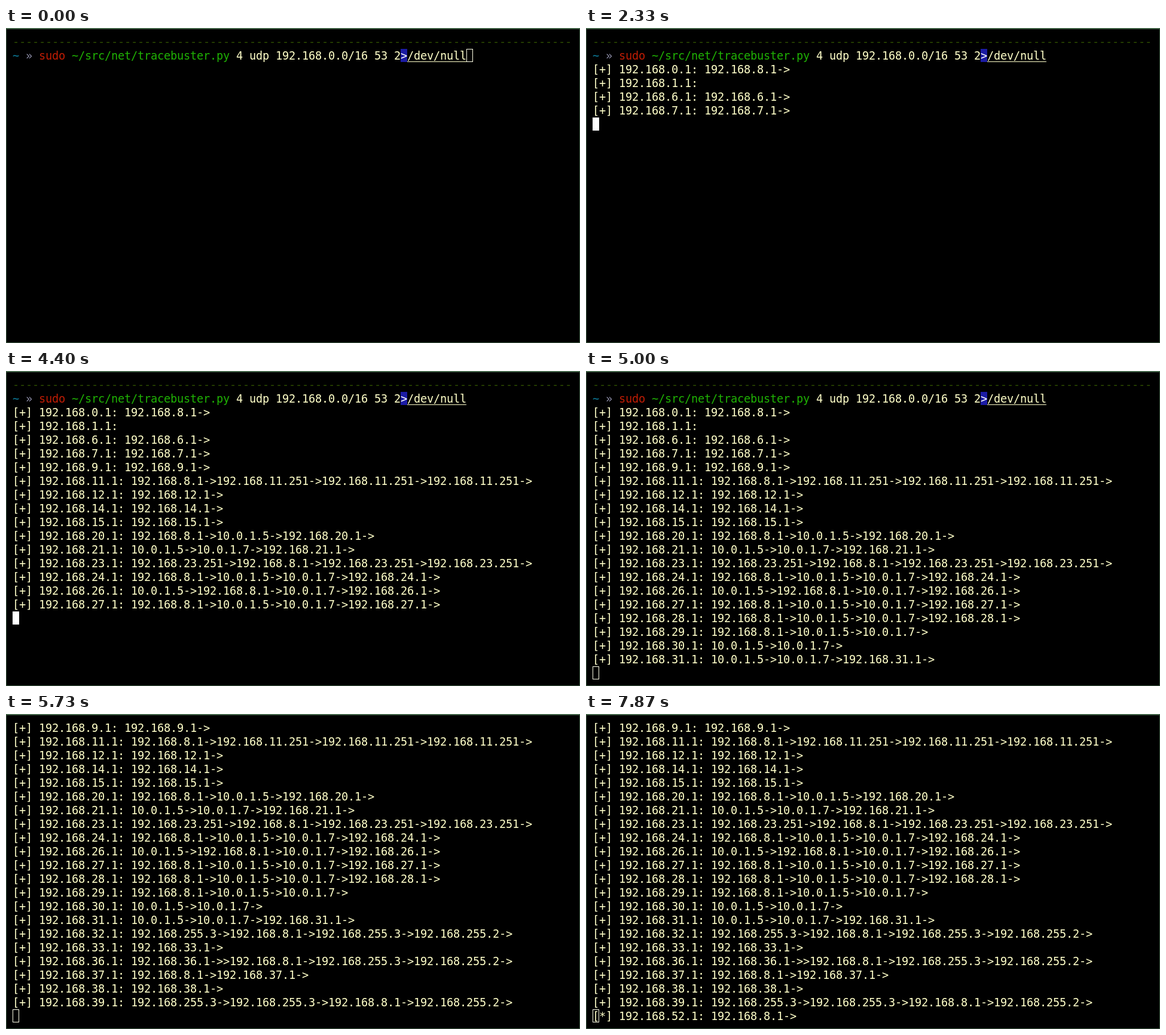
Animation of 960x528 px, one loop 8000 ms. Source, as an HTML page:

```html
<!DOCTYPE html>
<html lang="en">
<head>
<meta charset="utf-8">
<title>Terminal trace</title>
<style>
  html, body { margin: 0; width: 100%; height: 100%; overflow: hidden; background: #000; }
  #stage {
    position: relative; width: 960px; height: 528px; box-sizing: border-box; overflow: hidden;
    background: #000; border: 1px solid #38543d; border-top: 2px solid #46664b;
  }
  #view { position: absolute; left: 10px; top: 10px; width: 940px; height: 508px; overflow: hidden; }
  #page { position: absolute; left: 0; top: 0; }
  #page, #cursor {
    font: 18.67px/23px "DejaVu Sans Mono", monospace;
    letter-spacing: calc(11px - 1ch); white-space: pre; color: #ffffc8;
  }
  .row { height: 23px; position: relative; }
  .rule { color: #2c4a00; }
  .home { color: #0d7d9c; }
  .mark { color: #8c8ca6; }
  .sudo { color: #c01c04; }
  .path { color: #1fb204; }
  .pipe { position: absolute; left: 649px; top: 0; width: 11px; height: 22px; background: #1c1ca4; color: #fff; }
  .line { position: absolute; left: 660px; top: 21px; width: 99px; height: 1px; background: #ffffc8; }
  #cursor {
    position: absolute; width: 11px; height: 22px; box-sizing: border-box; overflow: hidden;
    background: #fff; color: #000;
  }
  #cursor.hollow { background: none; color: transparent; border: 1px solid #ffffe6; }
</style>
</head>
<body>
<div id="stage">
  <div id="view">
    <div id="page"><div class="row rule" id="rule"></div><div class="row"><span class="home">~</span> <span class="mark">»</span> <span class="sudo">sudo</span> <span class="path">~/src/net/tracebuster.py</span> 4 udp 192.168.0.0/16 53 2<span class="pipe">&gt;</span> /dev/null<i class="line"></i></div><div id="out"></div><div id="cursor"></div></div>
  </div>
</div>
<script>
const LOOP = 8000, ROWS = 22, ROW_H = 23, CELL = 11, PROMPT_END = 69;
const ENTER = 530, FOCUS = 330, BLUR = 5000;
const el = id => document.getElementById(id);
const page = el('page'), out = el('out'), cursor = el('cursor');
el('rule').textContent = '-'.repeat(85);

const events = [];
const address = hop => hop.split('.').length > 2 ? hop : '192.168.' + hop;
const trace = (host, hops) => `192.168.${host}.1: ` +
  hops.split(' ').filter(Boolean).map(h => address(h) + '->').join('');

// A finished line stays; a probe is overwritten by whatever comes next.
const done = (at, host, hops) => events.push({ at, keep: true, text: '[+] ' + trace(host, hops) });
const probe = (at, host, hops = '8.1') => events.push({ at, text: '[*] ' + trace(host, hops) });
const count = (at, step, from, to) => {
  for (let host = from; host <= to; host++) probe(at + step * (host - from), host);
};

const A = '10.0.1.5', B = '10.0.1.7', far = '255.3 8.1 255.3 255.2';

done(1330, 0, '8.1');
probe(1400, 1, '');
done(1530, 1, '');
count(1600, 133, 2, 5);
done(2200, 6, '6.1');
done(2330, 7, '7.1');
probe(2400, 8);
done(2530, 9, '9.1');
probe(2600, 10);
probe(2670, 11, '8.1 11.251');
done(2730, 11, '8.1 11.251 11.251 11.251');
done(2800, 12, '12.1');
probe(2870, 13);
done(2930, 14, '14.1');
done(3000, 15, '15.1');
probe(3070, 16, '');
probe(3130, 16);
probe(3330, 17);
probe(3470, 18);
probe(3530, 19);
probe(3670, 20, '8.1 ' + A);
done(3730, 20, `8.1 ${A} 20.1`);
done(3800, 21, `${A} ${B} 21.1`);
probe(3870, 22);
probe(3930, 23, '23.251 8.1');
done(4000, 23, '23.251 8.1 23.251 23.251');
done(4130, 24, `8.1 ${A} ${B} 24.1`);
probe(4200, 25);
done(4270, 26, `${A} 8.1 ${B} 26.1`);
probe(4330, 27, `8.1 ${A}`);
done(4400, 27, `8.1 ${A} ${B} 27.1`);
done(4470, 28, `8.1 ${A} ${B} 28.1`);
probe(4530, 29, '8.1 ' + A);
done(4670, 29, `8.1 ${A} ${B}`);
done(4800, 30, `${A} ${B}`);
done(4930, 31, `${A} ${B} 31.1`);
probe(5070, 32, '255.3 8.1');
done(5200, 32, far);
done(5330, 33, '33.1');
probe(5400, 34, far);
probe(5470, 35, far);
done(5530, 36, '36.1 >192.168.8.1 255.3 255.2');
done(5600, 37, '8.1 37.1');
done(5670, 38, '38.1');
done(5730, 39, '255.3 255.3 8.1 255.2');
count(5800, 133, 40, 43);
count(6400, 135, 44, 46);
count(6870, 200, 47, 52);

let last = '';
function draw(t) {
  const past = events.filter(e => e.at <= t);
  const hollow = t < FOCUS || t >= BLUR;
  const key = [past.length, hollow, t >= ENTER].join();
  if (key === last) return;
  last = key;

  const kept = past.filter(e => e.keep);
  const tail = past[past.length - 1];
  const status = tail && !tail.keep ? tail.text : '';
  out.textContent = [...kept.map(e => e.text), status].join('\n');

  const row = t < ENTER ? 1 : 2 + kept.length;
  cursor.style.left = (t < ENTER ? PROMPT_END * CELL : 0) + 'px';
  cursor.style.top = row * ROW_H + 'px';
  cursor.textContent = t < ENTER ? '' : status.charAt(0);
  cursor.className = hollow ? 'hollow' : '';
  page.style.top = -Math.max(0, row - ROWS + 1) * ROW_H + 'px';
}

const start = performance.now();
function tick() {
  draw((performance.now() - start) % LOOP);
  requestAnimationFrame(tick);
}
tick();
</script>
</body>
</html>
```
